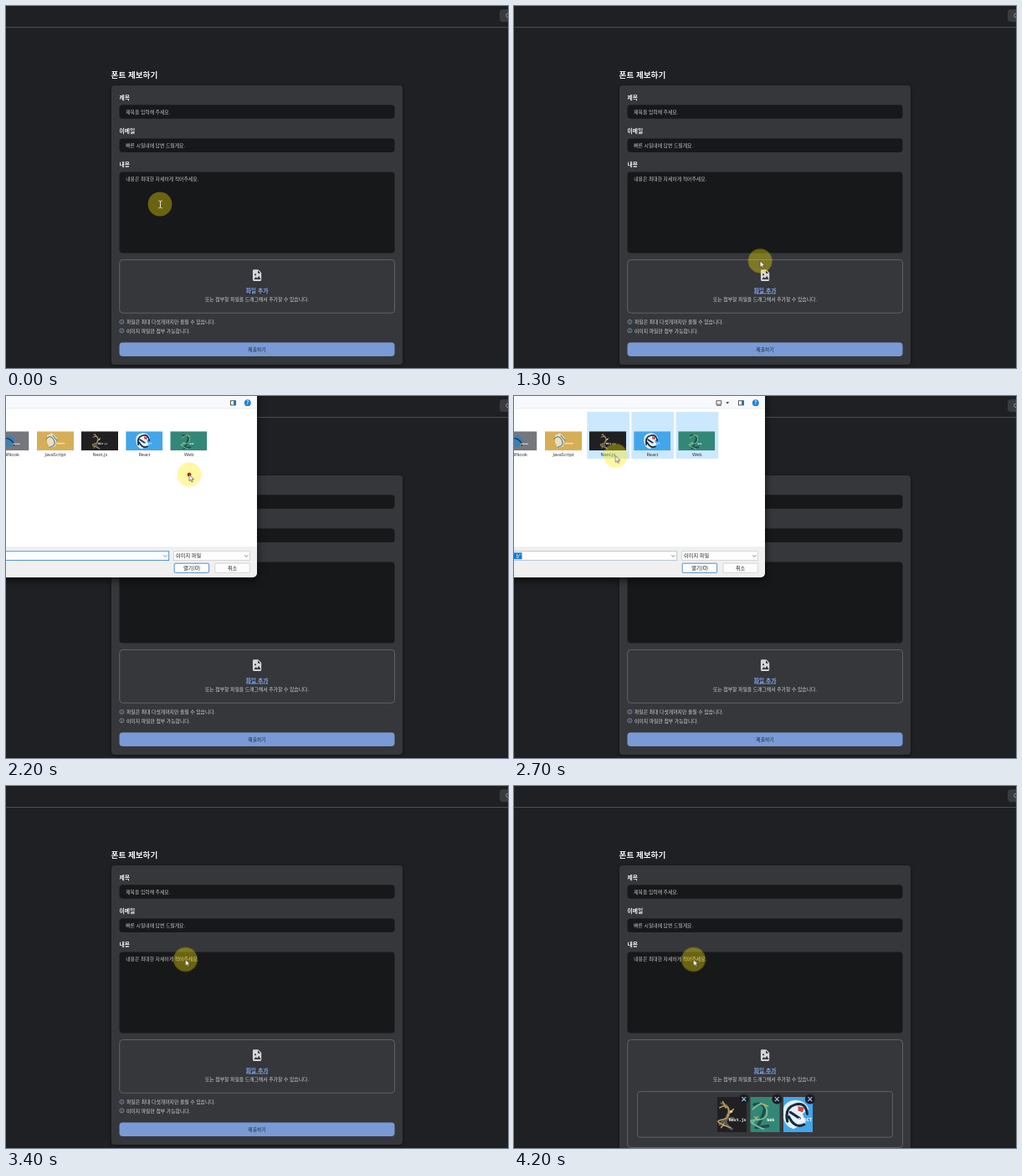
These frames come from a looping animation (600x433 px, 5300 ms). An HTML page:

```html
<!DOCTYPE html>
<html lang="ko">
<head>
<meta charset="utf-8">
<title>폰트 제보하기</title>
<style>
  html, body { margin: 0; width: 100%; height: 100%; overflow: hidden; background: #1f2023; }
  svg.stage { display: block; width: 600px; height: 433px; }
  text { font-family: "Noto Sans CJK KR", "Noto Sans KR", sans-serif; font-size: 5.83px; fill: #d2d3d5; }
  .title { font-size: 9.6px; font-weight: 700; fill: #f2f2f3; }
  .label { font-size: 6.75px; font-weight: 700; fill: #f2f2f3; }
  .hint { fill: #c3c4c7; }
  .link { font-size: 6.75px; font-weight: 700; fill: #7fa6ec; }
  .mid { text-anchor: middle; }
  .field { fill: #17181a; }
  .card { fill: #36373b; filter: drop-shadow(0 1px 2px #0006); }
  .frame { fill: none; stroke: #6b6c71; stroke-width: .8; }
  .info { fill: none; stroke: #9db4de; stroke-width: .6; }
  .name { font-family: "Open Sans", "Noto Sans", sans-serif; font-size: 5.5px; fill: #222; text-anchor: middle; }
  .ui { font-size: 6.2px; fill: #1b1b1b; }
  .art text { font-family: "DejaVu Sans Mono", monospace; font-size: 2.7px; font-weight: 700; fill: #fff; }
  .line { fill: none; stroke-linecap: round; stroke-linejoin: round; }
  .box { fill: #fdfdfd; stroke: #cfcfcf; stroke-width: .8; }

  .anim { animation: 5300ms step-end infinite; }
  .before { animation-name: before; }
  .after { animation-name: after; }
  .underline { animation-name: underline; }
  .dialog { animation-name: dialog; }
  .tools { animation-name: tools; }
  .path { animation-name: path; }
  .filetype { animation-name: filetype; }
  .chosen { animation-name: chosen; }
  .open { animation-name: open; }
  .sel { animation-name: sel; }
  .sel.last { animation-name: sel-last; }
  .beam { animation-name: beam; }
  .hand { animation-name: hand; }
  .arrow { animation-name: arrow; }
  .press { animation-name: press; }
  .band { animation-name: band; }
  .band rect { transform-origin: 219px 94px; animation: stretch 5300ms linear infinite; }
  .pointer { animation: move 5300ms ease-in-out infinite; }

  @keyframes before { 0% { opacity: 1 } 66.04%, to { opacity: 0 } }
  @keyframes after { 0% { opacity: 0 } 66.04%, to { opacity: 1 } }
  @keyframes underline { 0% { opacity: 0 } 9.43%, to { opacity: 1 } }
  @keyframes dialog { 0% { opacity: 0 } 37.74% { opacity: 1 } 64.15%, to { opacity: 0 } }
  @keyframes tools { 0% { opacity: 0 } 43.4%, to { opacity: 1 } }
  @keyframes path { 0% { stroke: #2a7fcb } 43.4%, to { stroke: #a9bccb } }
  @keyframes filetype { 0% { stroke: #cfcfcf } 52.8% { stroke: #2a7fcb } 54.7%, to { stroke: #cfcfcf } }
  @keyframes chosen { 0% { opacity: 0 } 49.06%, to { opacity: 1 } }
  @keyframes open { 0% { fill: #fdfdfd } 54.7%, to { fill: #cbe3f7 } }
  @keyframes sel { 0% { opacity: 0; fill: #cce8ff } 45.2% { opacity: 1; fill: #cce8ff } 60.38%, to { opacity: 1; fill: #d9d9d9 } }
  @keyframes sel-last { 0% { opacity: 0; fill: #cce8ff } 46.6% { opacity: 1; fill: #cce8ff } 60.38%, to { opacity: 1; fill: #d9d9d9 } }
  @keyframes beam { 0% { opacity: 1 } 6.6% { opacity: 0 } 25.47% { opacity: 1 } 28.6%, to { opacity: 0 } }
  @keyframes hand { 0% { opacity: 0 } 9.43% { opacity: 1 } 22.64%, to { opacity: 0 } }
  @keyframes arrow { 0% { opacity: 0 } 6.6% { opacity: 1 } 9.43% { opacity: 0 } 22.64% { opacity: 1 } 25.47% { opacity: 0 } 28.6%, to { opacity: 1 } }
  @keyframes press { 0% { opacity: 0 } 40.57% { opacity: 1 } 43.4%, to { opacity: 0 } }
  @keyframes band { 0% { opacity: 0 } 42.45% { opacity: 1 } 49.06%, to { opacity: 0 } }
  @keyframes stretch {
    0%, 42.45% { transform: scale(0); animation-timing-function: ease-in-out }
    48.1%, to { transform: scale(1) }
  }
  @keyframes move {
    0% { transform: translate(184px, 237px) }
    10.4%, 20.75% { transform: translate(311px, 344.5px) }
    33.96%, 35.85% { transform: translate(213px, 113.5px) }
    41.2%, 42.45% { transform: translate(219px, 94px) }
    48.1%, 49.43% { transform: translate(108px, 52px) }
    55.66%, to { transform: translate(214.5px, 207.5px) }
  }
</style>
</head>
<body>
<svg class="stage" viewBox="0 0 600 433">
  <defs>
    <symbol id="hub" class="art" viewBox="0 0 44 23" preserveAspectRatio="xMidYMid slice">
      <path fill="#75777d" d="M0 0h44v23H0z"/>
      <path fill="#3c7fb4" d="M13 8l9-4 6 7-6 8-8-2z"/>
      <path class="line" stroke="#25303c" stroke-width="1.3" d="M12 17q2-11 8-8t6 8"/>
      <path class="line" stroke="#dfe6ec" d="M25 15h8"/>
    </symbol>
    <symbol id="script" class="art" viewBox="0 0 44 23" preserveAspectRatio="xMidYMid slice">
      <path fill="#d6ae57" d="M0 0h44v23H0z"/>
      <path fill="#e9dfbf" d="M12 5l6-3 6 6-2 10-7 2-3-7z"/>
      <path class="line" stroke="#6d8796" stroke-width="1.2" d="M11 9q5-6 9 1t-5 9m4-14l5 6"/>
      <path class="line" stroke="#fff" stroke-width=".9" d="M24 14.5h9"/>
    </symbol>
    <symbol id="next" class="art" viewBox="0 0 44 23" preserveAspectRatio="xMidYMid slice">
      <path fill="#202022" d="M0 0h44v23H0z"/>
      <path class="line" stroke="#5f5c55" stroke-width="1.5" d="M15 4q7 2 4 8t3 9M14 18q4-5 9-4"/>
      <path class="line" stroke="#b99a61" stroke-width=".9" d="M14 7q5-3 6 2t-5 6 6 5M16 3l2 4m5 1l-4 4m-4 8l2-3"/>
      <circle cx="21.5" cy="9.5" r=".9" fill="#f0d79a"/>
      <text x="20" y="15.8" textLength="">Next.js</text>
    </symbol>
    <symbol id="react" class="art" viewBox="0 0 44 23" preserveAspectRatio="xMidYMid slice">
      <path fill="#43a5ea" d="M0 0h44v23H0z"/>
      <path fill="#e4f1f8" d="M12 10q0-7 8-8 7 0 9 6l-4 3 2 6-8 4q-7-2-7-11z"/>
      <path class="line" stroke="#182c43" stroke-width="1.7" d="M15 16q-2-9 5-11t8 6m-12 2q4 8 10 5M17 10l6 4"/>
      <path fill="#cf4940" d="M22 6l4 1-1 3-3-1z"/>
      <text x="22" y="16" style="font-size:3px">REACT</text>
    </symbol>
    <symbol id="web" class="art" viewBox="0 0 44 23" preserveAspectRatio="xMidYMid slice">
      <path fill="#338777" d="M0 0h44v23H0z"/>
      <path class="line" stroke="#1d4e4b" stroke-width="2" d="M15 5q9-2 6 6t-5 9l8-1"/>
      <path class="line" stroke="#76bd9b" stroke-width="1" d="M14 8q7-7 9 0t-7 7 5 6m-7-4l3-4"/>
      <path class="line" stroke="#c8a562" stroke-width=".8" d="M19 4l5 2m-9 7l3 2"/>
      <text x="23.3" y="15.8">Web</text>
    </symbol>
    <g id="info">
      <circle class="info" r="2.5"/>
      <path class="info" d="M0-.4v1.7M0-1.5v.5"/>
    </g>
    <g id="remove">
      <circle r="6" fill="#1b1d22"/>
      <path class="line" stroke="#a9c6f7" stroke-width="1.1" d="M-2.1-2.1l4.2 4.2m0-4.2l-4.2 4.2"/>
    </g>
    <path id="chevron" class="line" stroke="#555" stroke-width=".7" d="M-1.8-.9L0 .9l1.8-1.8"/>
  </defs>

  <rect width="600" height="433" fill="#1f2023"/>
  <path d="M0 25.5h600" stroke="#4c4d51"/>
  <rect x="590" y="4" width="20" height="15" rx="4" fill="#3a3b3f"/>
  <circle cx="600" cy="11.3" r="2.3" fill="none" stroke="#a3a4a8" stroke-width=".8"/>
  <text class="title" x="125.6" y="85.5">폰트 제보하기</text>

  <g class="anim before">
    <rect class="card" x="126" y="95" width="348" height="334" rx="4"/>
    <rect class="frame" x="135.7" y="303.5" width="328.8" height="63.7" rx="4"/>
    <use href="#info" x="138.4" y="377.8"/>
    <text x="144" y="380">파일은 최대 다섯개까지만 올릴 수 있습니다.</text>
    <use href="#info" x="138.4" y="388.3"/>
    <text x="144" y="390.5">이미지 파일만 첨부 가능합니다.</text>
    <rect x="135.5" y="402.5" width="329" height="16.5" rx="4" fill="#799ad5"/>
    <text class="mid" x="300" y="412.9" style="fill:#1f2638">제출하기</text>
  </g>

  <g class="anim after">
    <rect class="card" x="126" y="95" width="348" height="350" rx="4"/>
    <rect class="frame" x="135.7" y="303.5" width="328.8" height="129" rx="4"/>
    <rect class="frame" x="147.6" y="365.4" width="304.8" height="54.8" rx="3"/>
    <g style="clip-path:inset(0 round 4px)"><use href="#next" x="243" y="372" width="35" height="42"/></g>
    <g style="clip-path:inset(0 round 4px)"><use href="#web" x="282.5" y="372" width="35" height="42"/></g>
    <g style="clip-path:inset(0 round 4px)"><use href="#react" x="322" y="372" width="35" height="42"/></g>
    <use href="#remove" x="274.8" y="374.5"/>
    <use href="#remove" x="314.3" y="374.5"/>
    <use href="#remove" x="353.8" y="374.5"/>
  </g>

  <text class="label" x="135.5" y="111.7">제목</text>
  <rect class="field" x="135.5" y="118.2" width="329" height="16.5" rx="4"/>
  <text class="hint" x="143.2" y="128.5">제목을 입력해 주세요.</text>
  <text class="label" x="135.5" y="152">이메일</text>
  <rect class="field" x="135.5" y="158.4" width="329" height="16.5" rx="4"/>
  <text class="hint" x="143.2" y="168.8">빠른 시일내에 답변 드릴게요.</text>
  <text class="label" x="135.5" y="192">내용</text>
  <rect class="field" x="135.5" y="198.5" width="329" height="97" rx="4"/>
  <text class="hint" x="143.2" y="208.9">내용은 최대한 자세하게 적어주세요.</text>

  <path fill="#d5d6d8" d="M296.3 315.3h5.2l3.7 3.7v8.6q0 1.4-1.4 1.4h-7.5q-1.4 0-1.4-1.4v-10.9q0-1.4 1.4-1.4z"/>
  <path fill="#36373b" d="M301 316.3v3.4h3.3zM296.3 327l2.3-3 1.6 1.7 2-3 2.4 4.3z"/>
  <circle cx="298" cy="321.3" r="1.1" fill="#36373b"/>
  <text class="link mid" x="300" y="342.5">파일 추가</text>
  <path class="anim underline" d="M287 343.9h26.2" stroke="#7fa6ec" stroke-width=".8"/>
  <text class="mid" x="300" y="353.2">또는 첨부할 파일을 드래그해서 추가할 수 있습니다.</text>

  <g class="anim dialog">
    <rect x="-20" y="-20" width="320" height="237" rx="5" fill="#f0f0f0" style="filter:drop-shadow(0 3px 5px #000a)"/>
    <path fill="#fff" d="M0 0h299.6v181H0z"/>
    <path fill="#f7f9fc" d="M0 0h299.6v14.5H0z"/>
    <path d="M0 14.8h299.6M0 181h299.6" stroke="#e2e3e5" stroke-width=".7"/>
    <g class="anim tools">
      <path class="line" stroke="#333" stroke-width=".8" d="M242.3 5.7h5.4v4.3h-5.4zM242.5 11.3h5"/>
      <path fill="#333" d="M253.2 7.3h4l-2 2.2z"/>
    </g>
    <rect x="268.4" y="5.7" width="6" height="5.2" fill="#fff" stroke="#333" stroke-width=".8"/>
    <path fill="#2378bd" d="M272 5.7h2.5v5.2H272z"/>
    <circle cx="288.8" cy="8.2" r="3.9" fill="#1d84d6"/>
    <text class="mid" x="288.8" y="10.3" style="fill:#fff;font-weight:700">?</text>

    <rect class="anim sel last" x="87.3" y="19" width="50.7" height="56"/>
    <rect class="anim sel" x="140.4" y="19" width="50.7" height="56"/>
    <rect class="anim sel" x="193.6" y="19" width="50.7" height="56"/>
    <use href="#hub" x="-16.5" y="42.3" width="44" height="23"/>
    <use href="#script" x="37" y="42.3" width="44" height="23"/>
    <use href="#next" x="90" y="42.3" width="44" height="23"/>
    <use href="#react" x="143.2" y="42.3" width="44" height="23"/>
    <use href="#web" x="196.3" y="42.3" width="44" height="23"/>
    <text class="name" x="6" y="72">VilNook</text>
    <text class="name" x="59" y="72">JavaScript</text>
    <text class="name" x="112.3" y="72">Next.js</text>
    <text class="name" x="165.5" y="72">React</text>
    <text class="name" x="218.8" y="72">Web</text>
    <g class="anim band">
      <rect x="108" y="52" width="111" height="42" fill="#0078d7" fill-opacity=".25" stroke="#0078d7" stroke-width=".6" vector-effect="non-scaling-stroke"/>
    </g>

    <rect class="box anim path" x="-9" y="185.8" width="203.7" height="10.8"/>
    <use href="#chevron" x="190.3" y="191.5"/>
    <g class="anim chosen">
      <path fill="#1778cf" d="M0 187.4h9.5v7.8H0z"/>
      <text x="8.8" y="193.6" text-anchor="end" style="fill:#fff">b"</text>
    </g>
    <rect class="box anim filetype" x="200.4" y="185.8" width="91.2" height="10.8"/>
    <text class="ui" x="203" y="193.4">이미지 파일</text>
    <use href="#chevron" x="287.3" y="191.5"/>
    <rect class="box anim open" x="201.2" y="200.2" width="41.4" height="11.2" rx="1" style="stroke:#2a78be"/>
    <text class="ui mid" x="222" y="208">열기(O)</text>
    <rect class="box" x="249.9" y="200.2" width="41.4" height="11.2" rx="1"/>
    <text class="ui mid" x="270.6" y="208">취소</text>
  </g>

  <g class="pointer">
    <circle r="14.4" fill="#ffeb00" fill-opacity=".36"/>
    <circle class="anim press" r="2" fill="#c8321e" stroke="#6e1c12" stroke-width=".8"/>
    <g class="anim beam line">
      <path stroke="#eee" stroke-width=".9" d="M-1.3-4Q0-4 .5-3.3 1-4 2.3-4M.5-3.3v7.2M-1.3 4.6Q0 4.6.5 3.9 1 4.6 2.3 4.6"/>
    </g>
    <path class="anim hand" fill="#fff" stroke="#111" stroke-width=".5" stroke-linejoin="round"
      d="M-1 .6q.9-1 1.8 0v3.6q.8-.7 1.5.2.8-.6 1.4.3 1-.4 1.4.6v3q-.2 1.4-.9 2.5H.4Q-.5 9-2 6.900q.1-1.200 1 -.6z"/>
    <path class="anim arrow" fill="#fff" stroke="#111" stroke-width=".5" stroke-linejoin="round"
      d="M0 0v7.700l1.800-1.600 1.200 2.700 1.300-.6-1.200-2.600h2.400z"/>
  </g>
</svg>
</body>
</html>
```
